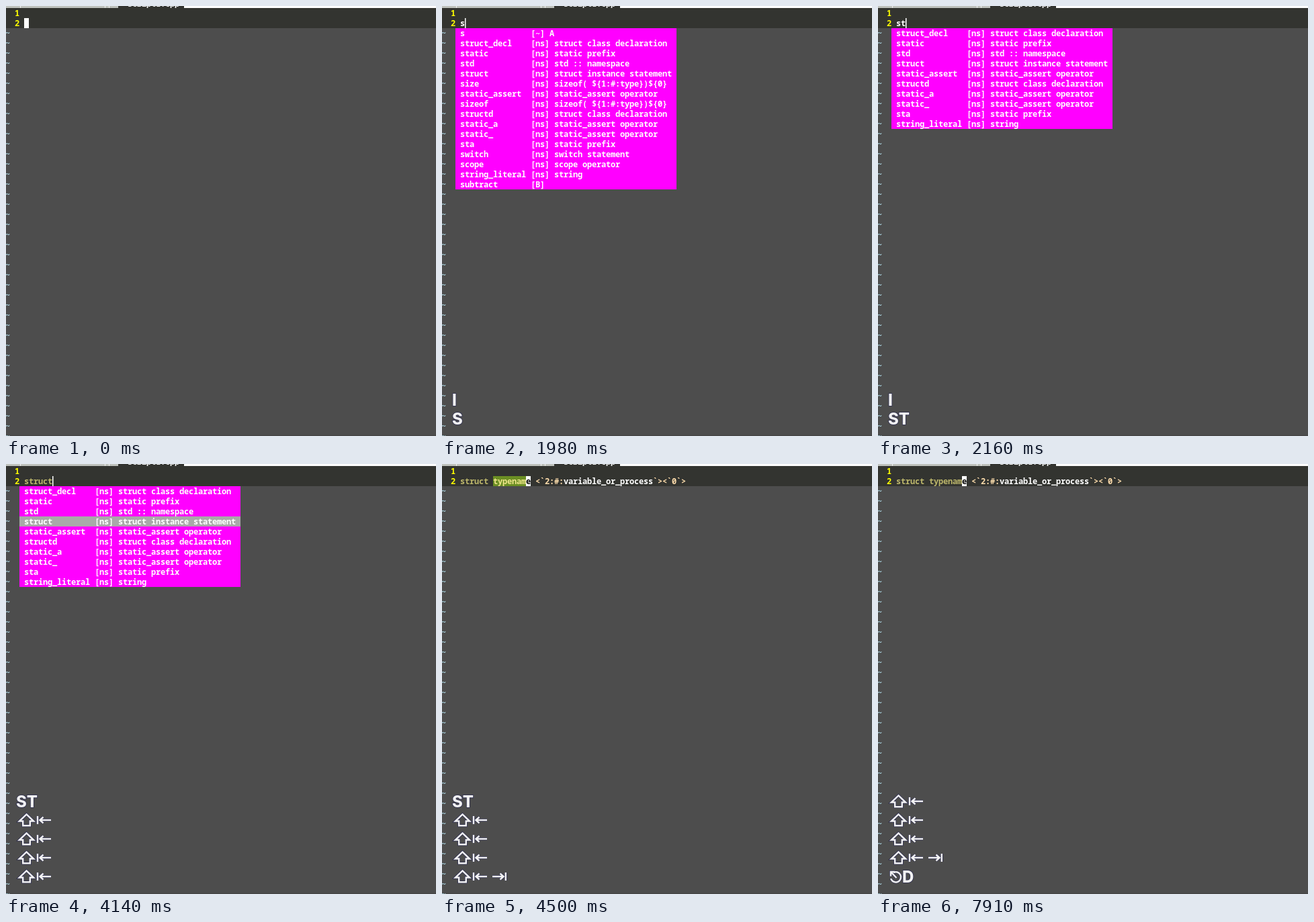
Write an HTML page with a canvas that moves like this. It is 640 px wide and 640 px high and loops after 8 s.

```html
<!DOCTYPE html>
<html lang="en">
<head>
<meta charset="utf-8">
<title>Snippet completion</title>
<style>
html, body { margin: 0; width: 100%; height: 100%; overflow: hidden; background: #4d4d4d; }
canvas { display: block; width: 640px; height: 640px; }
</style>
</head>
<body>
<canvas id="stage" width="640" height="640"></canvas>
<script>
const ctx = document.getElementById('stage').getContext('2d');
const LOOP = 8000, CELL = 7, ROW = 15, TEXT_X = 27, LINE_Y = 18;
const MONO = '12px "Noto Sans Mono", monospace';
const KEYS = '800 24px Inter, sans-serif';
const TYPE = '#bdb76b', SPECIAL = '#ffdead', WHITE = '#fff';
const KEY_FILL = '#f2f2f2', KEY_EDGE = '#2e2e50';

const menu = [
  ['s', '[~]', 'A'],
  ['struct_decl', '[ns]', 'struct class declaration'],
  ['static', '[ns]', 'static prefix'],
  ['std', '[ns]', 'std :: namespace'],
  ['struct', '[ns]', 'struct instance statement'],
  ['size', '[ns]', 'sizeof( ${1:#:type})${0}'],
  ['static_assert', '[ns]', 'static_assert operator'],
  ['sizeof', '[ns]', 'sizeof( ${1:#:type})${0}'],
  ['structd', '[ns]', 'struct class declaration'],
  ['static_a', '[ns]', 'static_assert operator'],
  ['static_', '[ns]', 'static_assert operator'],
  ['sta', '[ns]', 'static prefix'],
  ['switch', '[ns]', 'switch statement'],
  ['scope', '[ns]', 'scope operator'],
  ['string_literal', '[ns]', 'string'],
  ['subtract', '[B]', '']
];
const filtered = menu.filter(([word]) => word.startsWith('st'));

// Key lines: ^ shift, < back-tab, > tab, @ escape; letters are drawn as text.
const steps = [
  { at: 0, cursor: 'block', keys: [] },
  { at: 540, keys: ['I'] },
  { at: 1980, typed: 's', list: menu, keys: ['I', 'S'] },
  { at: 2160, typed: 'st', list: filtered, keys: ['I', 'ST'] },
  { at: 2700, typed: 'struct_decl', list: filtered, selected: 0, keys: ['I', 'ST', '^<'] },
  { at: 3060, typed: 'static', list: filtered, selected: 1, keys: ['I', 'ST', '^<', '^<'] },
  { at: 4140, typed: 'struct', list: filtered, selected: 3, keys: ['ST', '^<', '^<', '^<', '^<'] },
  { at: 4500, snippet: true, visual: true, keys: ['ST', '^<', '^<', '^<', '^<>'] },
  { at: 7560, snippet: true, keys: ['^<', '^<', '^<', '^<>', '@'] },
  { at: 7910, snippet: true, keys: ['^<', '^<', '^<', '^<>', '@D'] }
];

function rect(x, y, w, h, color) {
  ctx.fillStyle = color;
  ctx.fillRect(x, y, w, h);
}

function mono(text, x, top, color = WHITE, weight = 600) {
  ctx.font = `${weight} ${MONO}`;
  ctx.letterSpacing = '-0.2px';
  ctx.fillStyle = color;
  ctx.fillText(text, x, top + 12);
}

function drawEditor() {
  rect(0, 0, 640, 640, '#4d4d4d');
  rect(0, 638.5, 640, 1.5, '#464646');
  rect(0, 0, 640, 3, WHITE);
  rect(0, 0, 167, 3, '#bfc2bd');
  for (const x of [21, 147, 153]) rect(x, 0, 1, 3, '#f2f2f2');
  rect(167, 0, 98, 3, '#333430');
  ctx.save();
  ctx.beginPath();
  ctx.rect(0, 0, 265, 3);
  ctx.clip();
  mono('script1.cpp', 181, -11, WHITE, 700);
  ctx.restore();

  rect(0, 3, 640, 2 * ROW, '#333430');
  mono('1', 13, 3, '#ff0');
  mono('2', 13, LINE_Y, '#ff0');
  for (let y = 33; y < 640; y += ROW) mono('~', -1, y - 1, '#add8e6', 800);
}

function drawMenu({ list, selected }) {
  list.forEach(([word, kind, info], i) => {
    const y = 33 + i * ROW;
    rect(20, y, 329, ROW, i === selected ? '#a9a9a9' : '#f0f');
    mono(`${word.padEnd(15)}${kind} ${info}`, TEXT_X, y);
  });
}

function drawSnippet(visual) {
  if (visual) rect(76, LINE_Y, 49, ROW, '#6b8e23');
  const parts = [
    ['struct', TYPE, 800], [' '],
    ['typenam', visual ? '#f0e68c' : TYPE, 800], ['e', '#000', 800], [' '],
    ['<`2:#:', SPECIAL], ['variable_or_process'], ['`><`0`>', SPECIAL]
  ];
  rect(125, LINE_Y, CELL, ROW, WHITE);
  let x = TEXT_X;
  for (const [text, color, weight] of parts) {
    mono(text, x, LINE_Y, color, weight);
    x += text.length * CELL;
  }
}

function polyline(points) {
  const path = new Path2D();
  points.forEach(([x, y], i) => i ? path.lineTo(x, y) : path.moveTo(x, y));
  return path;
}

function join(...paths) {
  const all = new Path2D();
  paths.forEach(path => all.addPath(path));
  return all;
}

const ring = new Path2D();
ring.arc(11.5, 0.8, 7.6, -2.05, 2.85);

const shift = polyline([[15.5, -8.6], [26, 1.5], [20.8, 1.5], [20.8, 8.3],
  [10.2, 8.3], [10.2, 1.5], [5, 1.5]]);
shift.closePath();

// Icon paths are centred on the key line and offset from its left edge.
const icons = {
  '^': { width: 30, path: shift },
  '<': {
    width: 29,
    path: join(polyline([[2, -6], [2, 6]]), polyline([[5.5, 0], [22, 0]]),
      polyline([[10.5, -4.5], [5.5, 0], [10.5, 4.5]]))
  },
  '>': {
    width: 22,
    path: join(polyline([[1, 0], [17.5, 0]]), polyline([[12.5, -4.5], [17.5, 0], [12.5, 4.5]]),
      polyline([[20.8, -6], [20.8, 6]]))
  },
  '@': {
    width: 21,
    path: join(ring, polyline([[12.5, 2], [4.5, -6.5]]), polyline([[4, -0.5], [4, -7], [10, -7]]))
  }
};

function drawIcon({ path }, x, y) {
  ctx.save();
  ctx.translate(x, y);
  for (const [width, color] of [[4, KEY_EDGE], [2.5, KEY_FILL]]) {
    ctx.lineWidth = width;
    ctx.strokeStyle = color;
    ctx.stroke(path);
  }
  ctx.restore();
}

function drawLetter(letter, x, y) {
  ctx.font = KEYS;
  ctx.letterSpacing = '0px';
  ctx.lineWidth = 1.5;
  ctx.strokeStyle = KEY_EDGE;
  ctx.strokeText(letter, x, y + 9);
  ctx.fillStyle = KEY_FILL;
  ctx.fillText(letter, x, y + 9);
  return ctx.measureText(letter).width;
}

function drawKeys(lines) {
  lines.forEach((line, i) => {
    const y = 614 - (lines.length - 1 - i) * 28;
    let x = 15;
    for (const key of line) {
      const icon = icons[key];
      if (icon) drawIcon(icon, x, y);
      x += icon ? icon.width : drawLetter(key, x, y);
    }
  });
}

function draw(time) {
  const step = steps.findLast(({ at }) => at <= time);
  const { typed = '' } = step;
  drawEditor();
  if (step.snippet) {
    drawSnippet(step.visual);
  } else {
    const keyword = typed === 'static' || typed === 'struct';
    mono(typed, TEXT_X, LINE_Y, keyword ? TYPE : WHITE, keyword ? 800 : 600);
    rect(TEXT_X + typed.length * CELL, LINE_Y, step.cursor === 'block' ? CELL : 1.5, ROW, WHITE);
  }
  if (step.list) drawMenu(step);
  drawKeys(step.keys);
}

const start = performance.now();
function tick() {
  draw((performance.now() - start) % LOOP);
  requestAnimationFrame(tick);
}
tick();
</script>
</body>
</html>
```
